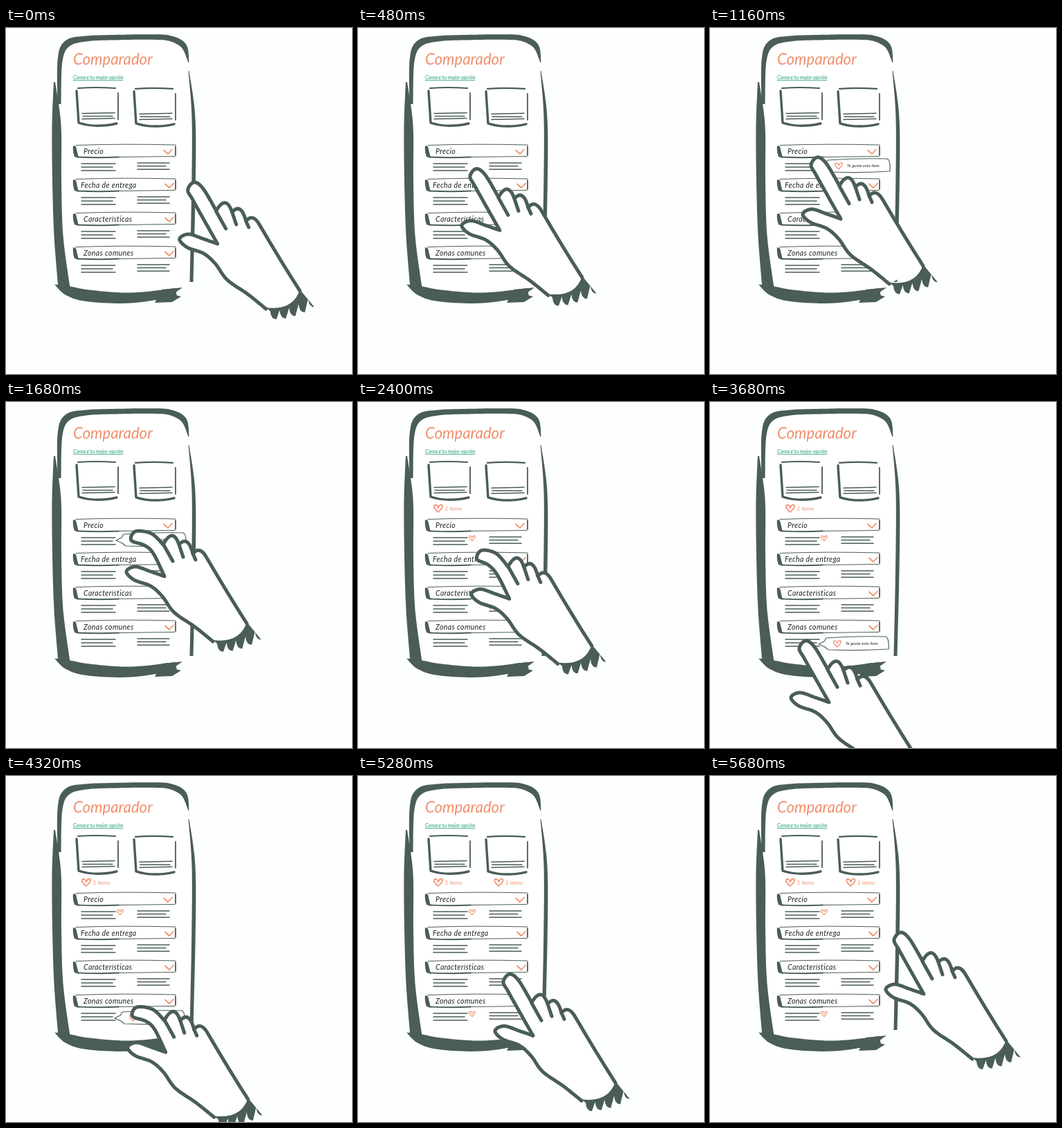
An HTML page that plays this animation: 500 by 500 pixels, repeating every 6560 ms.

```html
<!DOCTYPE html>
<html lang="es">
<head>
<meta charset="utf-8">
<title>Comparador</title>
<style>
  html, body { margin: 0; width: 100%; height: 100%; overflow: hidden; background: #fdfefe; }
  svg { display: block; width: 100%; height: 100%; }
  text { font-family: Lato, "Open Sans", sans-serif; font-style: italic; fill: #1d2422; }
  .ink { fill: #4a5d57; }
  .line { fill: none; stroke: #4a5d57; stroke-linecap: round; stroke-linejoin: round; }
  .mark { fill: none; stroke: #f0916f; stroke-linecap: round; stroke-linejoin: round; }
  .coral { fill: #f0916f; }
  .label { font-size: 10.6px; letter-spacing: .35px; }
</style>
</head>
<body>
<svg viewBox="0 0 500 500">
  <defs>
    <path id="heart" d="M0 5C-4 2-7-1-6-4C-4-7-1-4 0-1C1-5 5-7 6-4C7-1 3 2 0 5Z"/>
    <g id="card" class="line">
      <path stroke-width="2.2" d="M104 87Q130 85 158 87"/>
      <path stroke-width="3.4" d="M102 91L105 137Q130 145 160 138"/>
      <path stroke-width="1.8" d="M162 94V132"/>
      <path stroke-width="1.4" d="M110 123.5L157 122.5M111 127.5H154M110 131.5L157 130.5"/>
    </g>
    <g id="bar" class="line">
      <path class="ink" stroke="none" d="M97 170L101 171L105 188L99 186Q96 178 97 170Z"/>
      <path stroke-width="1" d="M101 169.5Q170 167 245 169M163 186.5L244 185.5"/>
      <path stroke-width="1.8" d="M104 186.5Q135 188 163 186.5M245 171V184"/>
    </g>
  </defs>

  <rect x="76" y="14" width="192" height="370" rx="32" fill="#fff"/>
  <g id="phone" class="ink"></g>
  <text class="coral" x="97" y="53" font-size="22.2">Comparador</text>
  <text x="97" y="74" font-size="7.4" style="fill:#199675" text-decoration="underline">Conoce tu mejor opción</text>
  <use href="#card"/>
  <use href="#card" x="83" y=".8"/>
  <g id="rows"></g>
  <g id="likes"></g>

  <g id="tip">
    <path fill="#fff" stroke="#4a5d57" stroke-width="1.2" stroke-linejoin="round" d="M168 341Q210 338 254 339Q259 341 258 357Q215 360 171 358L166 354L157 350L165 346Z"/>
    <use href="#heart" class="mark" stroke-width="1.5" transform="translate(184 349.5) scale(.88)"/>
    <text x="196" y="351" font-size="6.3">Te gusta este ítem</text>
  </g>

  <g id="hand">
    <path id="skin" class="line" style="fill:#fff" stroke-width="5"/>
    <path class="line" stroke-width="5" d="M304 265L318 290M327 266L333 284M347 279L351 288"/>
    <path id="cuff" class="ink"/>
  </g>
</svg>
<script>
const LOOP = 6560;
const $ = id => document.getElementById(id);
const mix = (a, b, p) => a + (b - a) * p;
const ramp = (t, from, to) => Math.min(1, Math.max(0, (t - from) / (to - from)));
const swing = p => (1 - Math.cos(Math.PI * p)) / 2;
const glide = p => 1 - (1 - p) ** 2 * (1 + p / 4);

// Catmull-Rom samples through key points of any dimension
function spline(keys, n = 10) {
  const at = i => keys[Math.min(keys.length - 1, Math.max(0, i))];
  const out = [];
  for (let s = 0; s <= (keys.length - 1) * n; s++) {
    const i = Math.floor(s / n), u = s / n - i;
    const [a, b, c, d] = [at(i - 1), at(i), at(i + 1), at(i + 2)];
    out.push(b.map((v, k) => v + u / 2 * (c[k] - a[k] +
      u * (2 * a[k] - 5 * v + 4 * c[k] - d[k] + u * (3 * (v - c[k]) + d[k] - a[k])))));
  }
  return out;
}
const poly = pts => "M" + pts.map(p => p.map(v => v.toFixed(2))).join("L");

// Brush stroke through [x, y, width] keys
function brush(keys) {
  const pts = spline(keys);
  const edge = side => pts.map(([x, y, w], i) => {
    const [ax, ay] = pts[Math.max(0, i - 1)], [bx, by] = pts[Math.min(pts.length - 1, i + 1)];
    const k = side * w / 2 / Math.hypot(bx - ax, by - ay);
    return [x - (by - ay) * k, y + (bx - ax) * k];
  });
  return `<path d="${poly([...edge(1), ...edge(-1).reverse()])}Z"/>`;
}
$("phone").innerHTML = [
  [[77, 110, 5], [78, 48, 7], [88, 23, 10], [115, 15.5, 8], [165, 13.5, 7.5], [210, 13, 7.5], [237, 15, 8], [257, 26, 8], [264, 50, 1]],
  [[70, 78, 2], [73, 140, 13], [73.5, 220, 13], [76, 300, 13], [84, 376, 17]],
  [[71, 371, 1], [90, 380, 14], [120, 387, 17], [180, 390, 15], [246, 382, 12]],
  [[264, 62, 1], [271, 130, 5], [271, 230, 5.5], [268, 367, 5]]
].map(brush).join("") + `<path d="M225 378L255 375L241 385L253 388L240 396L215 397Z"/>`;

const rowY = i => 49 * i;
const underlines = [0, 1, 2].map(k =>
  `M109 ${196 + 5 * k}h${49 - 4 * (k % 2)}M190 ${195 + 4.6 * k}h${46 - 5 * (k % 2)}`).join("");
$("rows").innerHTML = ["Precio", "Fecha de entrega", "Características", "Zonas comunes"].map((label, i) =>
  `<g transform="translate(0 ${rowY(i)})">
    <use href="#bar"/>
    <path class="line" stroke-width="1.5" d="${underlines}"/>
    <text class="label" x="${i === 1 ? 108 : 112}" y="181.5">${label}</text>
    <path class="mark" stroke-width="1.8" d="M${i ? 230 : 228} 176.5l6 5.5l6-6.5"/>
  </g>`).join("");

// A like fills a card's counter and marks a row
$("likes").innerHTML = [0, 3].map((row, i) =>
  `<g><use href="#heart" class="mark" stroke-width="1.7" transform="translate(${116 + 87.5 * i} 154)"/>
    <text class="coral" x="${125.5 + 87.5 * i}" y="157" font-size="8.3">1 items</text>
    <use href="#heart" class="mark" stroke-width="1.7" transform="translate(165 ${197 + rowY(row)}) scale(.7)"/></g>`).join("");
const likes = $("likes").children;

// Hand: palm and thumb are rigid, the index finger bends
const palm = spline([[376, 406], [350, 385], [320, 364], [303, 341], [286, 326], [262, 317], [251, 305], [264, 298], [286, 305], [306, 312]]);
const straight = [[306, 312], [285, 275], [270, 248], [263, 234], [272, 223], [285, 232], [304, 264]];
const bent = [[306, 312], [290, 279], [277, 267], [258, 260], [264, 247], [287, 250], [304, 266]];
const knuckles = "Q318 240 327 266Q340 252 347 279Q357 267 367 285Q398 338 425 380";

let cuff = "M376 404";
for (let i = 0; i < 5; i++) {
  const x = 391 + 13.7 * i, y = 421 - .2 * i - 1.05 * i * i;
  cuff += `L${x - 9} ${y - 12}Q${x - 8} ${y} ${x} ${y}`;
}
$("cuff").setAttribute("d", cuff + "L425 378Q415 409 376 404Z");

// Moves: start, end, x, y, curl, easing
const moves = [
  [0, 900, -134, -26, 0, glide],
  [940, 1540, -77, -60, 1, swing],
  [2260, 3600, -134, 122, 0, glide],
  [3890, 4340, -75, 87, 1, swing],
  [5060, 5680, 3, 3, 0, swing]
];
function pose(t) {
  let x = 0, y = 0, curl = 0;
  for (const [from, to, tx, ty, tc, ease] of moves) {
    const p = ramp(t, from, to), e = ease(p);
    x = mix(x, tx, e);
    y = mix(y, ty, e);
    curl = mix(curl, tc, swing(tc ? ramp(p, .4, .95) : ramp(p, 0, .35)));
  }
  return { x, y, curl };
}
const shown = (t, a, b, c, d) => ramp(t, a, b) * (1 - ramp(t, c, d));

function draw(t) {
  const { x, y, curl } = pose(t);
  const finger = straight.map((p, i) => p.map((v, k) => mix(v, bent[i][k], curl)));
  $("skin").setAttribute("d", poly([...palm, ...spline(finger)]) + knuckles);
  $("hand").setAttribute("transform", `translate(${x} ${y})`);

  const first = t < 2260;
  $("tip").setAttribute("transform", first ? "translate(2 -150)" : "");
  $("tip").setAttribute("opacity", first ? shown(t, 860, 940, 1720, 1840) : shown(t, 3600, 3680, 4360, 4520));
  likes[0].setAttribute("opacity", ramp(t, 1840, 1960));
  likes[1].setAttribute("opacity", ramp(t, 4600, 4720));
}

const start = performance.now();
function tick() {
  draw((performance.now() - start) % LOOP);
  requestAnimationFrame(tick);
}
draw(0);
requestAnimationFrame(tick);
</script>
</body>
</html>
```
